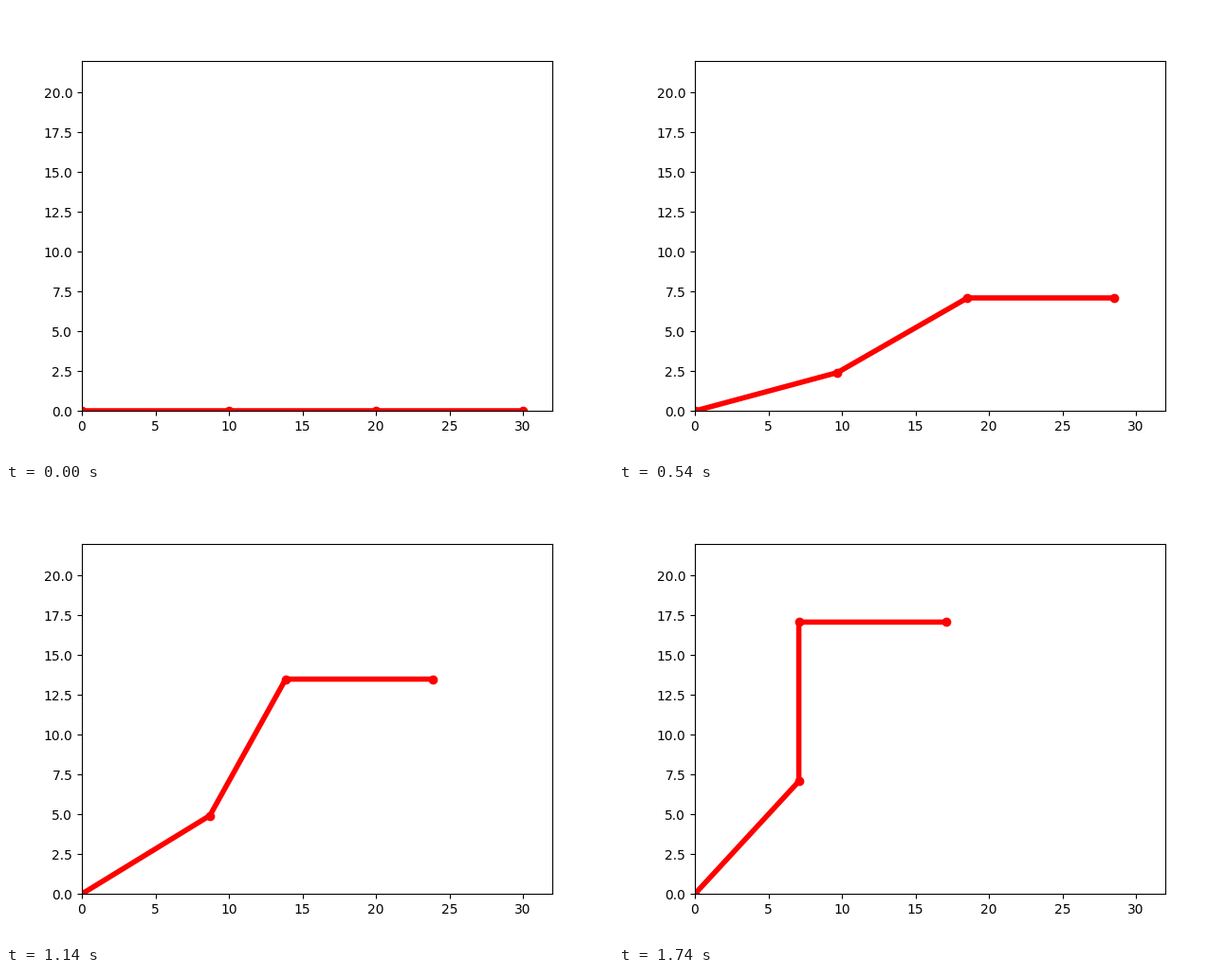
A matplotlib script that plays this animation: 640 by 480 pixels, repeating every 1.8 s.

```python
import numpy as np
import matplotlib.pyplot as plt
from matplotlib.animation import FuncAnimation

FRAMES = 30
LINK = 10
MAX_ANGLE = np.pi / 4

fig, ax = plt.subplots(figsize=(6.4, 4.8), dpi=100)
ax.set_xlim(0, 32)
ax.set_ylim(0, 22)
arm, = ax.plot([], [], "o-", color="red", lw=4, markersize=6)


def joints(angle):
    """Joint positions of the arm; the last link stays level."""
    headings = np.array([angle, 2 * angle, 0])
    x = np.append(0, np.cumsum(LINK * np.cos(headings)))
    y = np.append(0, np.cumsum(LINK * np.sin(headings)))
    return x, y


def update(i):
    arm.set_data(*joints(MAX_ANGLE * i / (FRAMES - 1)))
    return arm,


anim = FuncAnimation(fig, update, frames=FRAMES, interval=60, repeat=True)
plt.show()
```
